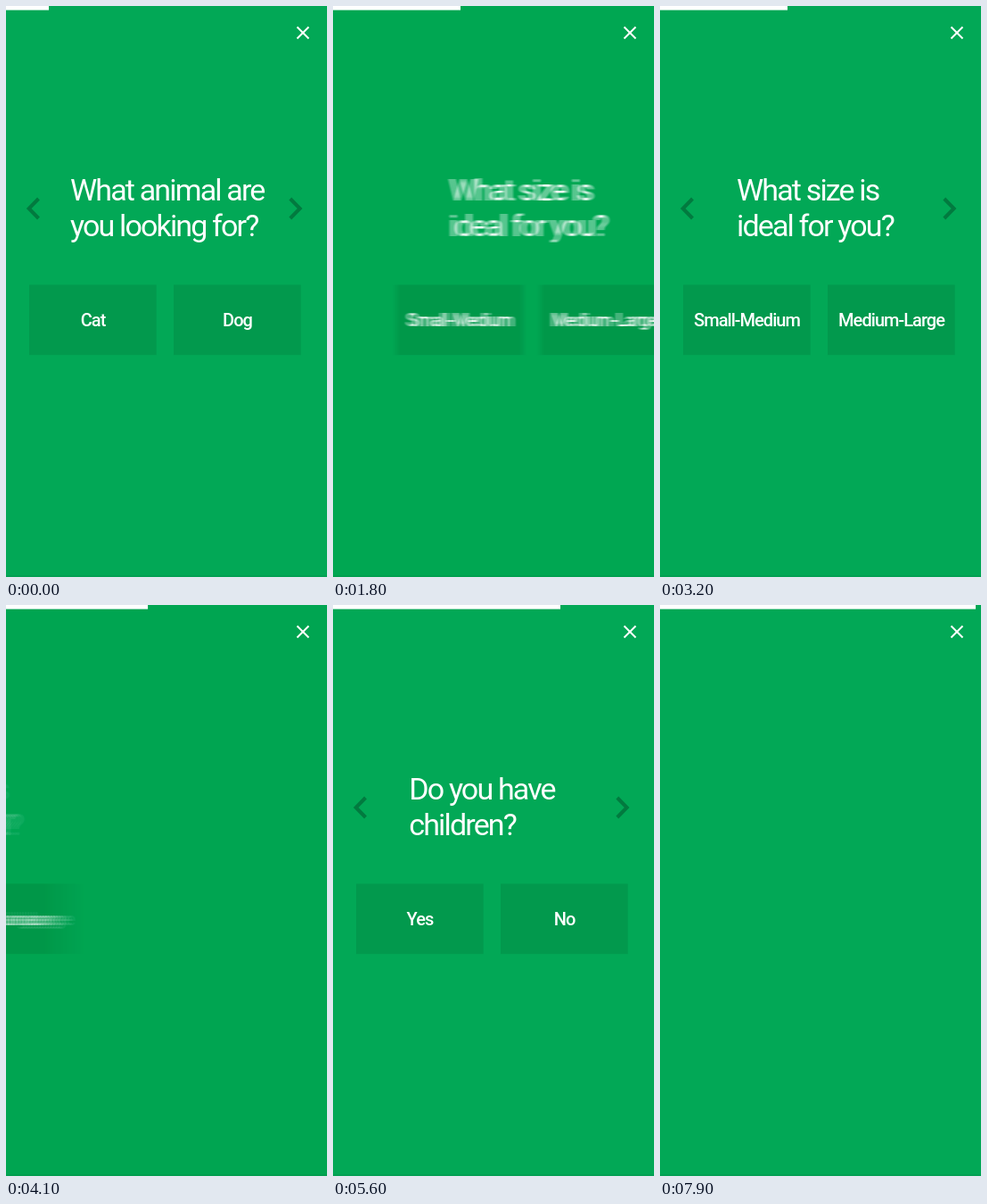
An HTML page with a canvas for the animation above (8 s loop, 360 by 640 pixels).

```html
<!DOCTYPE html>
<html lang="en">
<head>
<meta charset="utf-8">
<title>Pet quiz</title>
<style>
  html, body { margin: 0; width: 100%; height: 100%; overflow: hidden; background: #02a856; }
  canvas { display: block; }
</style>
</head>
<body>
<canvas id="stage" width="360" height="640"></canvas>
<script>
const W = 360, H = 640, LOOP = 8000;
const GREEN = '#02a856', BUTTON = '#02994d', ARROW = '#027a3f';
const SHUTTER = 21; // ms of motion blur
const BAR_TIME = 700, ENTER_TIME = 1105, ENTER_FROM = 340;

// enter, press and exit are start times in ms
const slides = [
  { lines: ['What animal are', 'you looking for?'], x: 72, options: ['Cat', 'Dog'],
    enter: -5000, press: -5000, exit: 460, bar: 48 },
  { lines: ['What size is', 'ideal for you?'], x: 86, options: ['Small-Medium', 'Medium-Large'],
    enter: 1050, press: 2680, exit: 3860, bar: 143 },
  { lines: ['Do you have', 'children?'], x: 85.3, options: ['Yes', 'No'],
    enter: 4250, press: 5880, exit: 7060, bar: 255 }
];
const LAST_BAR = 354;

const ctx = document.getElementById('stage').getContext('2d');
const clamp = v => Math.min(1, Math.max(0, v));
const easeInOut = u => u < 0.5 ? 4 * u ** 3 : 1 - 4 * (1 - u) ** 3;

// Each slide is painted once, with an empty stage on both sides.
function paintSlide(slide) {
  const layer = document.createElement('canvas');
  layer.width = W * 3;
  layer.height = H;
  const g = layer.getContext('2d');
  g.fillStyle = GREEN;
  g.fillRect(0, 0, W * 3, H);
  g.translate(W, 0);

  g.fillStyle = BUTTON;
  for (const x of [26, 188]) g.fillRect(x, 312.5, 142.6, 78.7);

  g.fillStyle = '#fff';
  g.font = '400 34px Roboto, sans-serif';
  g.letterSpacing = '-1.85px';
  slide.lines.forEach((line, i) => g.fillText(line, slide.x, 217.5 + i * 40));

  g.font = '500 20px Roboto, sans-serif';
  g.letterSpacing = '-0.95px';
  g.textAlign = 'center';
  slide.options.forEach((label, i) => g.fillText(label, 97.5 + i * 162, 359));
  return layer;
}

function offsetAt(slide, t) {
  if (t > slide.exit) return Math.max(-W, -262 * ((t - slide.exit) / 240) ** 2);
  return ENTER_FROM * (1 - easeInOut(clamp((t - slide.enter) / ENTER_TIME)));
}

function drawSlide(slide, t) {
  const from = offsetAt(slide, t - SHUTTER / 2);
  const to = offsetAt(slide, t + SHUTTER / 2);
  const blur = Math.abs(to - from);
  const n = blur < 0.4 ? 1 : Math.min(16, Math.ceil(blur) + 1);
  for (let k = 0; k < n; k++) {
    const x = n === 1 ? offsetAt(slide, t) : from + (to - from) * k / (n - 1);
    ctx.globalAlpha = 1 / (k + 1); // running average of the samples
    ctx.drawImage(slide.layer, x - W, 0);
  }
  ctx.globalAlpha = 1;
}

function drawPress(slide, t) {
  const u = (t - slide.press) / 500;
  if (u <= 0 || u >= 1) return;
  ctx.fillStyle = `rgba(0, 0, 0, ${0.08 * Math.min(1, u * 4)})`;
  ctx.fillRect(26, 312.5, 142.6, 78.7);
  ctx.fillStyle = '#fff';
  ctx.font = '500 20px Roboto, sans-serif';
  ctx.letterSpacing = '-0.95px';
  ctx.textAlign = 'center';
  ctx.fillText(slide.options[0], 97.5, 359);
}

function stroke(points, color, width) {
  ctx.beginPath();
  points.forEach(([x, y], i) => i ? ctx.lineTo(x, y) : ctx.moveTo(x, y));
  ctx.strokeStyle = color;
  ctx.lineWidth = width;
  ctx.stroke();
}

function drawArrows(slide, t) {
  const shown = clamp((t - slide.enter - 950) / 280);
  const hidden = clamp((t - slide.exit) / 150);
  ctx.globalAlpha = shown * (1 - hidden);
  stroke([[36.5, 216], [25.7, 227], [36.5, 238]], ARROW, 4);
  stroke([[318.8, 216], [329.6, 227], [318.8, 238]], ARROW, 4);
  ctx.globalAlpha = 1;
}

function barAt(t) {
  return slides.reduce((w, slide, i) => {
    const next = i + 1 < slides.length ? slides[i + 1].bar : LAST_BAR;
    return w + (next - slide.bar) * easeInOut(clamp((t - slide.exit - 10) / BAR_TIME));
  }, slides[0].bar);
}

function draw(t) {
  ctx.fillStyle = GREEN;
  ctx.fillRect(0, 0, W, H);

  const slide = slides.find(s => t >= s.enter && t < s.exit + 310);
  if (slide) {
    drawSlide(slide, t);
    drawPress(slide, t);
    drawArrows(slide, t);
  }

  ctx.fillStyle = '#fff';
  ctx.fillRect(0, 0, barAt(t), 4.6);
  stroke([[326.5, 23.5], [339.5, 36.5]], '#fff', 2);
  stroke([[339.5, 23.5], [326.5, 36.5]], '#fff', 2);
  ctx.fillStyle = 'rgba(0, 0, 0, 0.05)';
  ctx.fillRect(0, 638, W, 2);
}

for (const slide of slides) slide.layer = paintSlide(slide);

const start = performance.now();
function tick() {
  draw((performance.now() - start) % LOOP);
  requestAnimationFrame(tick);
}
tick();
</script>
</body>
</html>
```
